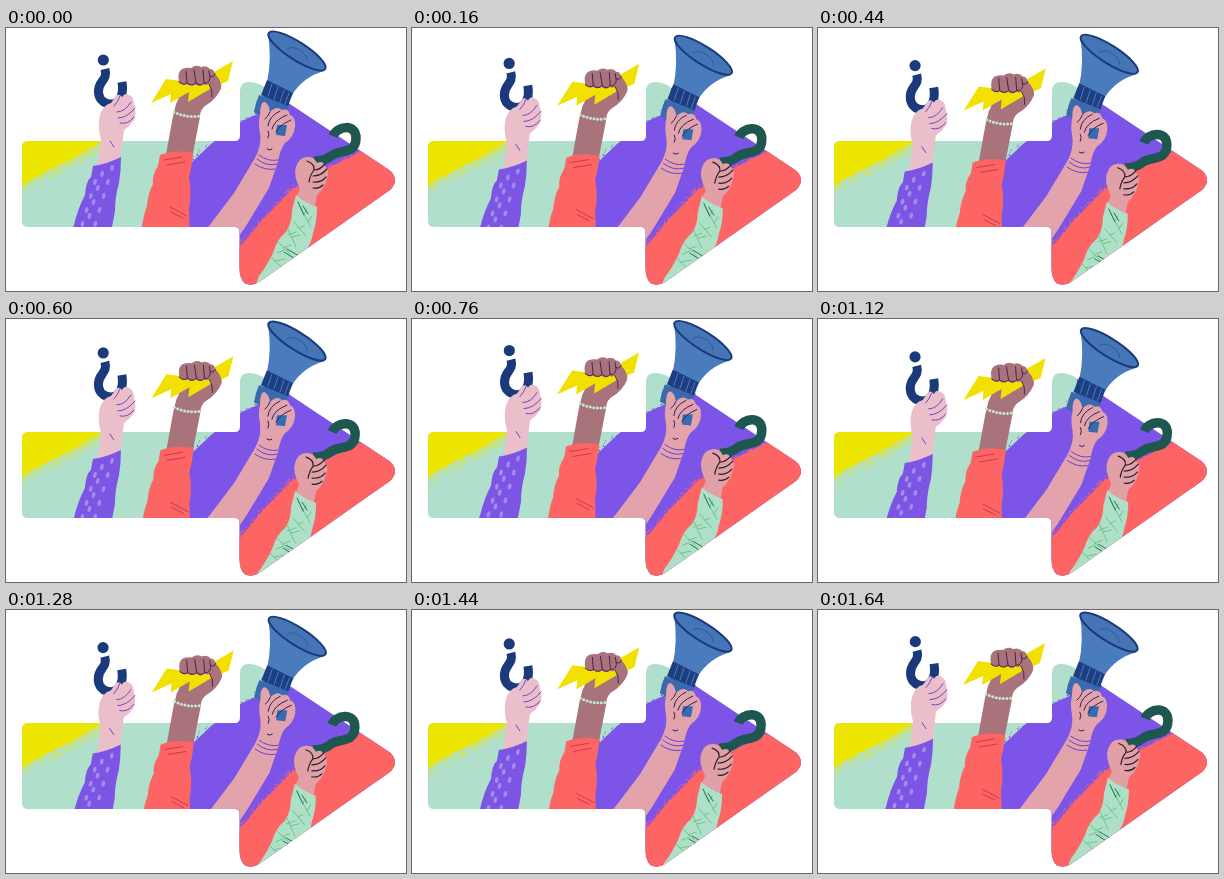
Write an HTML page that moves like this. It is 400 px wide and 263 px high and loops after 1.68 s.

```html
<!DOCTYPE html>
<html lang="en">
<head>
<meta charset="utf-8">
<title>Raised hands</title>
<style>
  html, body { margin: 0; height: 100%; overflow: hidden; background: #fff; }
  svg { display: block; width: 100vw; height: 100vh; }
  .line { fill: none; stroke-width: 1; stroke-linecap: round; stroke-linejoin: round; }
</style>
</head>
<body>
<svg viewBox="0 0 400 263">
  <defs>
    <clipPath id="arrow">
      <path d="M22 113H229Q234 113 234 108V63Q234 54 243 54Q250 54 256 57.5L384 142.5Q394 152 384 162L256 252Q247 259 239 255.5Q233.500 251 233.500 240V204Q233.500 199 229 199H22Q16 199 16 193V119Q16 113 22 113Z"/>
    </clipPath>
    <clipPath id="above">
      <path d="M0 0H400V152H389Q390 157 384 162L256 252Q247 259 239 255.500Q233.500 251 233.500 240V204Q233.500 199 229 199H0Z"/>
    </clipPath>
  </defs>

  <g id="backdrop" clip-path="url(#arrow)">
    <path fill="#b0e0cb" d="M0 0H400V263H0Z"/>
    <path fill="#ece500" d="M0 100H110L90 117L58 135L38 145L0 166Z"/>
    <path fill="#7c54e8" d="M400 40H262L256 84L236 93L205 116L180 140V199L234 263H400Z"/>
    <path fill="#fd6464" d="M400 104L350 126L322 140L286 162L256 192L230 224V263H400Z"/>
  </g>

  <g clip-path="url(#above)">
    <g class="arm">
      <circle cx="97.300" cy="32" r="5.600" fill="#1b3a7c"/>
      <path fill="none" stroke="#1b3a7c" stroke-width="9" d="M99 41C102 53 92 52 92.500 64C93 77 108 79 113 72Q118 66 116 54"/>
      <path fill="#ebbfc9" d="M91 140L95 112Q91 97 94 87Q97 77 105 75L110 68Q113 65 116 69Q119 64 123 67Q128 69 128 76Q131 85 128 92Q124 98 118 102L114 136Z"/>
      <path class="line" stroke="#7c3fd0" d="M108 78Q112 74 114 68M111 84Q119 84 125 74M112 90Q121 90 129 80M114 95Q122 97 128 89M104 113L108 119"/>
      <path fill="#7c55e4" d="M87 138Q101 136 115 129Q115 143 113 155Q109 169 109 183L103 215H60L68 197Q72 180 79 167Q80 153 85 149Z"/>
      <g id="spots" fill="#a48cec"/>
    </g>

    <g class="arm">
      <path fill="#a9737c" d="M159 132L167 88L170 76Q174 69 175 60L213 50Q216 54 215 60Q211 71 199 78Q194 82 194 89L186 130Z"/>
      <path fill="#f2e100" d="M227 33L222 53L204 61L182 74L183 64L164 75L165 66L145 75L160 51L176 53L208 44Z"/>
      <path fill="#a9737c" d="M173 54Q171 44 176 41Q181 39 185 40Q190 36 195 39Q201 37 204 41Q208 41 209 46Q216 53 215 60Q212 67 207 70Q207 62 203 56Q200 58 197 56Q194 60 189 56Q185 59 181 56Q176 58 173 54Z"/>
      <path class="line" stroke="#4a2350" d="M173 54Q178 58 181 55L180 43M181 55Q186 59 190 55L188 42M190 55Q195 59 198 55L197 42M198 55Q203 56 204 50L203 43M204 48Q208 50 209 46M203 56Q207 62 206 69"/>
      <path class="line" stroke="#c4e8d0" style="stroke-width:3" stroke-dasharray="0 3.600" d="M168 84Q180 90 194 88"/>
      <path fill="#fd6464" d="M154 127Q170 121 187 125Q186 139 183 149Q186 166 183 180L184 215H135Q135 193 141 178Q142 165 147 156Q146 147 152 138Z"/>
      <path class="line" stroke="#c93a50" d="M158 132L176 129M161 137L179 134M164 179L181 188M165 184L177 190"/>
    </g>

    <g class="arm">
      <path fill="#3a69ad" d="M253 67L284 76L280 83L264 84L257 89L248 84L250 75Z"/>
      <path fill="#4a7cbd" d="M262 6Q266 31 261 54L286 67Q297 49 318 43Z"/>
      <path fill="#1d3e80" d="M261 52L287 65L282 78L255 67Z"/>
      <path class="line" stroke="#4a7cbd" d="M266 56L262 68M272 59L268 71M278 62L274 74M283 65L279 76"/>
      <ellipse cx="291" cy="23" rx="33.500" ry="9" transform="rotate(32.500 291 23)" fill="#4675b5" stroke="#1b3a7c" stroke-width="2"/>
      <path class="line" stroke="#2f5a9c" d="M281 21Q287 17 295 23Q302 28 301 33"/>
      <path fill="#e3a3ac" d="M176 230L203 198L228 165L249 130Q256 117 254 105Q252 95 254 87Q254 73 259 74Q263 76 264 84Q271 77 276 82Q282 80 284 87Q290 89 289 99Q288 109 279 115Q274 121 272 134L263 160L240 198L218 230Z"/>
      <path fill="#346bb1" d="M271 97L281 97L279 108L270 107Z"/>
      <path class="line" stroke="#252653" d="M264 84Q262 89 259 91M262 98Q263 88 274 83M266 101Q268 92 281 87M270 104Q273 97 285 92M262 110Q264 106 262 103M261 121Q264 123 266 121"/>
      <path class="line" stroke="#6d3fd0" d="M253 127Q262 134 272 132M251 131Q261 139 271 136M249 136Q259 143 269 141"/>
    </g>

    <g class="arm">
      <path fill="none" stroke="#1e5650" stroke-width="9.500" d="M327 108C331 98 350 95 350 110C350 127 333 121 325 128Q319 133 308 133"/>
      <path fill="#e0a0a5" d="M289 172L294 161Q287 147 290 139Q293 129 301 129Q308 128 311 135Q317 132 319 138Q324 141 321 150Q319 160 311 167L308 182Z"/>
      <path class="line" stroke="#26202b" style="stroke-width:1.200" d="M301 133Q309 136 308 142Q304 147 303 154M308 142Q314 142 319 136M307 148Q315 148 321 141M307 154Q315 155 320 149M307 160Q313 161 317 157"/>
      <path fill="#aee0c8" d="M290 167Q299 175 311 179Q311 194 307 205Q306 214 300 222L290 255L246 266L253 248Q259 241 267 225Q271 211 280 204Q286 195 286 183Z"/>
      <path class="line" stroke="#70c28d" d="M293 177L305 199M288 194L300 208M282 201L290 219M272 214L284 226M265 229L275 239M298 186L301 181M302 194L306 188M293 200L298 198M286 209L294 207M277 220L285 217M269 233L279 231M278 222L271 225M290 204L282 207"/>
      <path class="line" stroke="#27734f" d="M292 174L298 187M297 178L302 186M278 224L291 232M281 221L293 228"/>
    </g>
  </g>
</svg>
<script>
const PERIOD = 840, STEP = 40;
const SVG = 'http://www.w3.org/2000/svg';
const $ = id => document.getElementById(id);

function add(parent, tag, attrs) {
  const el = document.createElementNS(SVG, tag);
  for (const key in attrs) el.setAttribute(key, attrs[key]);
  parent.append(el);
}

let seed = 7;
const random = () => (seed = (seed * 16807) % 2147483647) / 2147483647;

// Chalky speckles scattered around a colour boundary
function grain(x0, y0, x1, y1, fill, count, spread) {
  const length = Math.hypot(x1 - x0, y1 - y0);
  const nx = (y0 - y1) / length, ny = (x1 - x0) / length;
  let d = '';
  for (let i = 0; i < count; i++) {
    const k = random(), off = (random() + random() - 1) * spread, s = .5 + random();
    const x = x0 + (x1 - x0) * k + nx * off, y = y0 + (y1 - y0) * k + ny * off;
    d += `M${x.toFixed(1)} ${y.toFixed(1)}h${s.toFixed(1)}v1h-${s.toFixed(1)}z`;
  }
  add($('backdrop'), 'path', { d, fill });
}
grain(14, 160, 95, 115, '#ece500', 300, 8);
grain(180, 140, 258, 84, '#7c54e8', 350, 8);
grain(232, 221, 286, 162, '#fd6464', 220, 6);
grain(286, 162, 370, 117, '#fd6464', 260, 6);

// Staggered columns of spots down the sleeve
for (let i = 0; i < 6; i++) {
  for (const [x, y] of [[96, 146], [106, 140], [89, 154]]) {
    const cx = x - i * 4.2, cy = y + i * 14;
    add($('spots'), 'ellipse', { cx, cy, rx: 1.8, ry: 3, transform: `rotate(12 ${cx} ${cy})` });
  }
}

// Sway of each arm: horizontal and vertical travel, time of its highest point
const sways = [
  { dx: -.3, dy: 6.8, top: -70 },
  { dx: .7, dy: 7.6, top: -10 },
  { dx: .6, dy: 7.5, top: -140 },
  { dx: -1.2, dy: 7, top: 40 }
];
const arms = document.querySelectorAll('.arm');
const swing = t => (1 - Math.cos(2 * Math.PI * t / PERIOD)) / 2;

function draw(now) {
  const t = Math.floor(now / STEP) * STEP % PERIOD;
  sways.forEach(({ dx, dy, top }, i) => {
    const k = swing(t - top) - swing(-top);
    arms[i].setAttribute('transform', `translate(${dx * k} ${dy * k})`);
  });
}
function tick() {
  draw(performance.now());
  requestAnimationFrame(tick);
}
tick();
</script>
</body>
</html>
```
